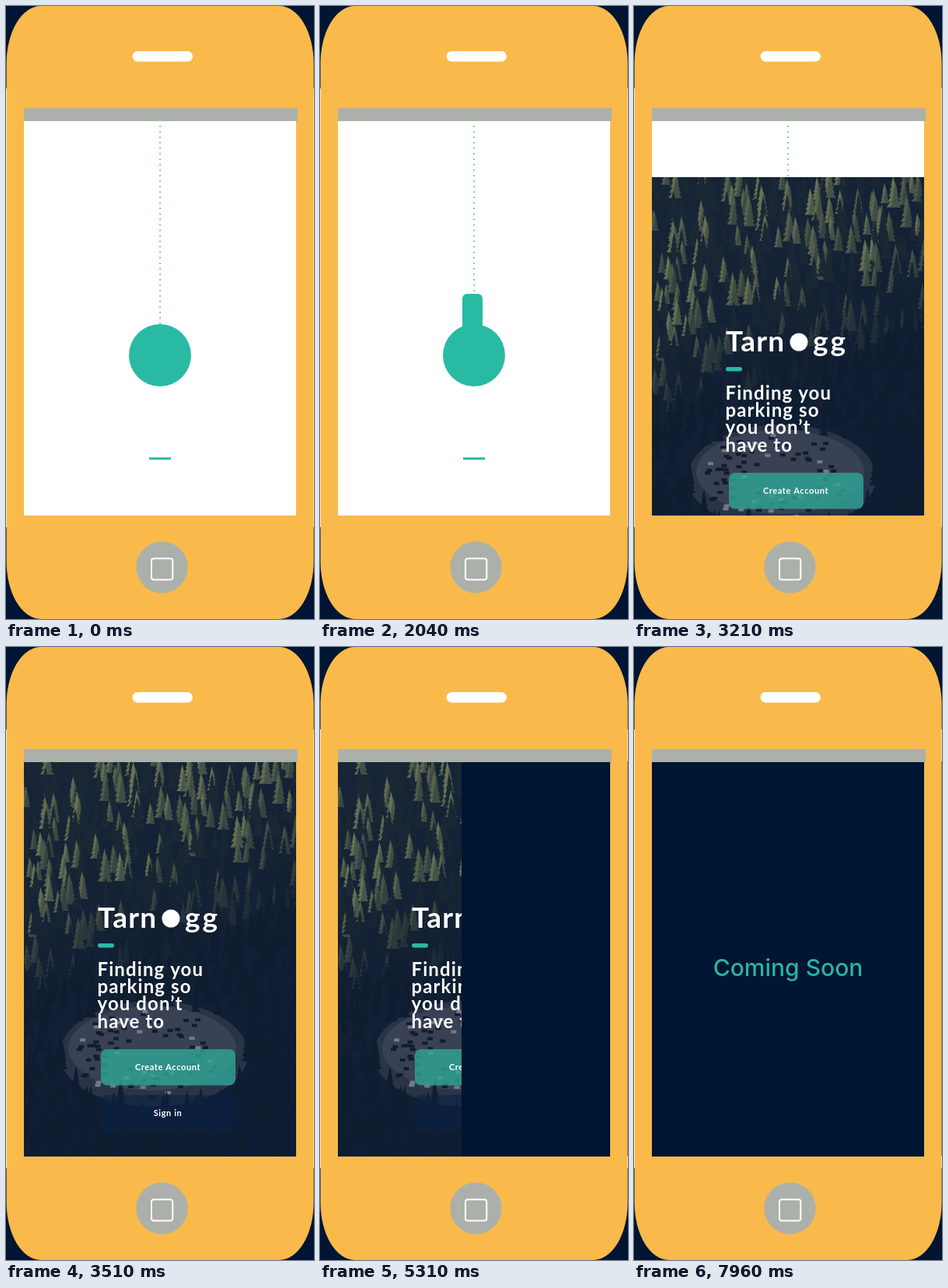
An HTML page with a canvas for the animation above (7.99 s loop, 396 by 788 pixels).

```html
<!DOCTYPE html>
<html lang="en">
<head>
<meta charset="utf-8">
<title>Parking app intro</title>
<style>
  html, body { margin: 0; width: 100%; height: 100%; overflow: hidden; background: #001433; }
  canvas { display: block; }
</style>
</head>
<body>
<canvas id="stage" width="396" height="788"></canvas>
<script>
const LOOP = 7990;
const NAVY = '#001433', YELLOW = '#f9ba4b', GRAY = '#abb1aa', TEAL = '#29baa4', WHITE = '#fff';
const SCREEN = { x: 23, y: 148, w: 350, h: 507 };
const PAGE_TOP = 137; // the page rests partly behind the status bar

const ctx = document.getElementById('stage').getContext('2d');

const clamp = v => Math.max(0, Math.min(1, v));
const progress = (t, from, to) => clamp((t - from) / (to - from));
const easeOut = (p, power) => 1 - Math.pow(1 - p, power);
const lerp = (a, b, p) => a + (b - a) * p;

function rect(c, color, x, y, w, h) {
  c.fillStyle = color;
  c.fillRect(x, y, w, h);
}

function pill(c, color, x, y, w, h, r) {
  c.fillStyle = color;
  c.beginPath();
  c.roundRect(x, y, w, h, r);
  c.fill();
}

function disc(c, color, x, y, rx, ry = rx) {
  c.fillStyle = color;
  c.beginPath();
  c.ellipse(x, y, rx, ry, 0, 0, Math.PI * 2);
  c.fill();
}

function label(c, text, x, y, size, spacing, align = 'left') {
  c.font = `700 ${size}px Lato, sans-serif`;
  c.letterSpacing = spacing + 'px';
  c.textAlign = align;
  c.fillStyle = WHITE;
  c.fillText(text, x, y);
}

function randomizer(seed) {
  return () => {
    seed = (seed * 1664525 + 1013904223) % 4294967296;
    return seed / 4294967296;
  };
}

const mix = (a, b, p) => `rgb(${a.map((v, i) => Math.round(lerp(v, b[i], p))).join()})`;

function tree(c, x, base, h, color) {
  c.fillStyle = color;
  c.beginPath();
  for (let i = 0; i < 5; i++) {
    const top = base - h + i * h * 0.17;
    const half = h * (0.07 + i * 0.035);
    c.moveTo(x, top);
    c.lineTo(x + half, top + h * 0.3);
    c.lineTo(x - half, top + h * 0.3);
  }
  c.fill();
}

function drawForest(c) {
  const rnd = randomizer(41);
  const shade = c.createLinearGradient(60, 137, 330, 655);
  shade.addColorStop(0, '#172536');
  shade.addColorStop(0.5, '#132035');
  shade.addColorStop(1, '#0d1b34');
  rect(c, shade, 23, PAGE_TOP, 350, 518);

  disc(c, '#2a3447', 190, 523, 121, 68);
  disc(c, '#394254', 188, 516, 108, 54);
  for (let i = 0; i < 80; i++) {
    const a = rnd() * Math.PI * 2, r = 0.4 + rnd() * 0.55;
    const x = 186 + Math.cos(a) * 112 * r, y = 521 + Math.sin(a) * 58 * r;
    rect(c, rnd() < 0.2 ? '#737b88' : '#111c2f', x, y, 7, 4);
  }

  for (let y = 145; y < 690; y += 9) {
    for (let x = 14; x < 385; x += 19) {
      const tx = x + rnd() * 19, ty = y + rnd() * 9, h = 26 + rnd() * 18;
      const tone = rnd(), keep = rnd();
      const inClearing = ((tx - 190) / 118) ** 2 + ((ty - 532) / 70) ** 2 < 1;
      if (inClearing || keep < 0.3) continue;
      const light = clamp((485 - ty - 0.35 * tx) / 130) * (tone < 0.62 ? 0.12 : tone);
      tree(c, tx, ty, h, mix([15, 29, 48], [106, 116, 86], light));
      if (light > 0.3) tree(c, tx + h * 0.07, ty, h * 0.8, mix([17, 32, 48], [74, 87, 74], light));
    }
  }
}

function makePage() {
  const canvas = document.createElement('canvas');
  canvas.width = 350;
  canvas.height = 518;
  const c = canvas.getContext('2d');
  c.translate(-23, -PAGE_TOP);
  drawForest(c);

  label(c, 'Tarn', 118, 361, 37, 1.2);
  disc(c, WHITE, 212, 349, 11.5);
  label(c, 'gg', 230, 361, 37, 3);
  pill(c, TEAL, 118, 381, 21, 5.5, 2.75);
  ['Finding you', 'parking so', 'you don’t', 'have to'].forEach((line, i) =>
    label(c, line, 117.5, 423 + i * 22.2, 24, 1.1));

  pill(c, 'rgba(47,170,153,.78)', 122, 517, 173, 46.5, 8);
  label(c, 'Create Account', 208, 544, 11, 0.6, 'center');
  pill(c, 'rgba(10,32,68,.6)', 122, 576, 173, 47, 8);
  label(c, 'Sign in', 208, 603, 11, 0.6, 'center');
  return canvas;
}

function drawPhone(t) {
  rect(ctx, NAVY, 0, 0, 396, 788);
  rect(ctx, WHITE, 0, 106, 396, 564);
  if (t >= 4810) rect(ctx, NAVY, 395, 147, 1, 507);
  ctx.fillStyle = YELLOW;
  ctx.beginPath();
  ctx.roundRect(0.6, 0, 395, 788, [{ x: 44, y: 74 }]);
  ctx.fill();

  pill(ctx, WHITE, 162.5, 58, 77.5, 13.5, 6.75);
  disc(ctx, GRAY, 200.5, 721.5, 33.2);
  ctx.strokeStyle = WHITE;
  ctx.lineWidth = 2;
  ctx.beginPath();
  ctx.roundRect(187, 710.3, 27.3, 27.3, 3);
  ctx.stroke();
}

function drawParking(t) {
  rect(ctx, WHITE, SCREEN.x, SCREEN.y, SCREEN.w, SCREEN.h);
  for (let y = 154; y < 423; y += 7.04) rect(ctx, TEAL, 197.2, y, 1.8, 1.4);
  disc(ctx, TEAL, 198, 449, 40);
  rect(ctx, TEAL, 184, 580.3, 28, 3);
  const bottom = lerp(148, 424, progress(t, 30, 2040));
  pill(ctx, TEAL, 183, bottom - 54, 26, 54, 6);
}

function drawComingSoon(t) {
  const left = lerp(360, SCREEN.x, easeOut(progress(t, 5010, 5790), 1.54));
  rect(ctx, NAVY, left, SCREEN.y, 373 - left, SCREEN.h);

  ctx.globalAlpha = 0.97 * easeOut(progress(t, 6280, 7960), 1.6);
  ctx.font = '500 30px Inter, sans-serif';
  ctx.textAlign = 'center';
  ctx.fillStyle = TEAL;
  ctx.fillText('Coming Soon', 198, 423);
  ctx.globalAlpha = 1;
}

const page = makePage();

function draw(t) {
  drawPhone(t);
  ctx.save();
  ctx.beginPath();
  ctx.rect(SCREEN.x, SCREEN.y, SCREEN.w, SCREEN.h);
  ctx.clip();
  drawParking(t);
  if (t >= 2540) {
    const top = lerp(788, PAGE_TOP, easeOut(progress(t, 2540, 3510), 1.75));
    ctx.drawImage(page, SCREEN.x, top);
  }
  if (t >= 4810) drawComingSoon(t);
  ctx.restore();
  rect(ctx, GRAY, 23, 131.3, 352, 16.7);
}

const start = performance.now();
function tick() {
  draw((performance.now() - start) % LOOP);
  requestAnimationFrame(tick);
}
tick();
</script>
</body>
</html>
```
